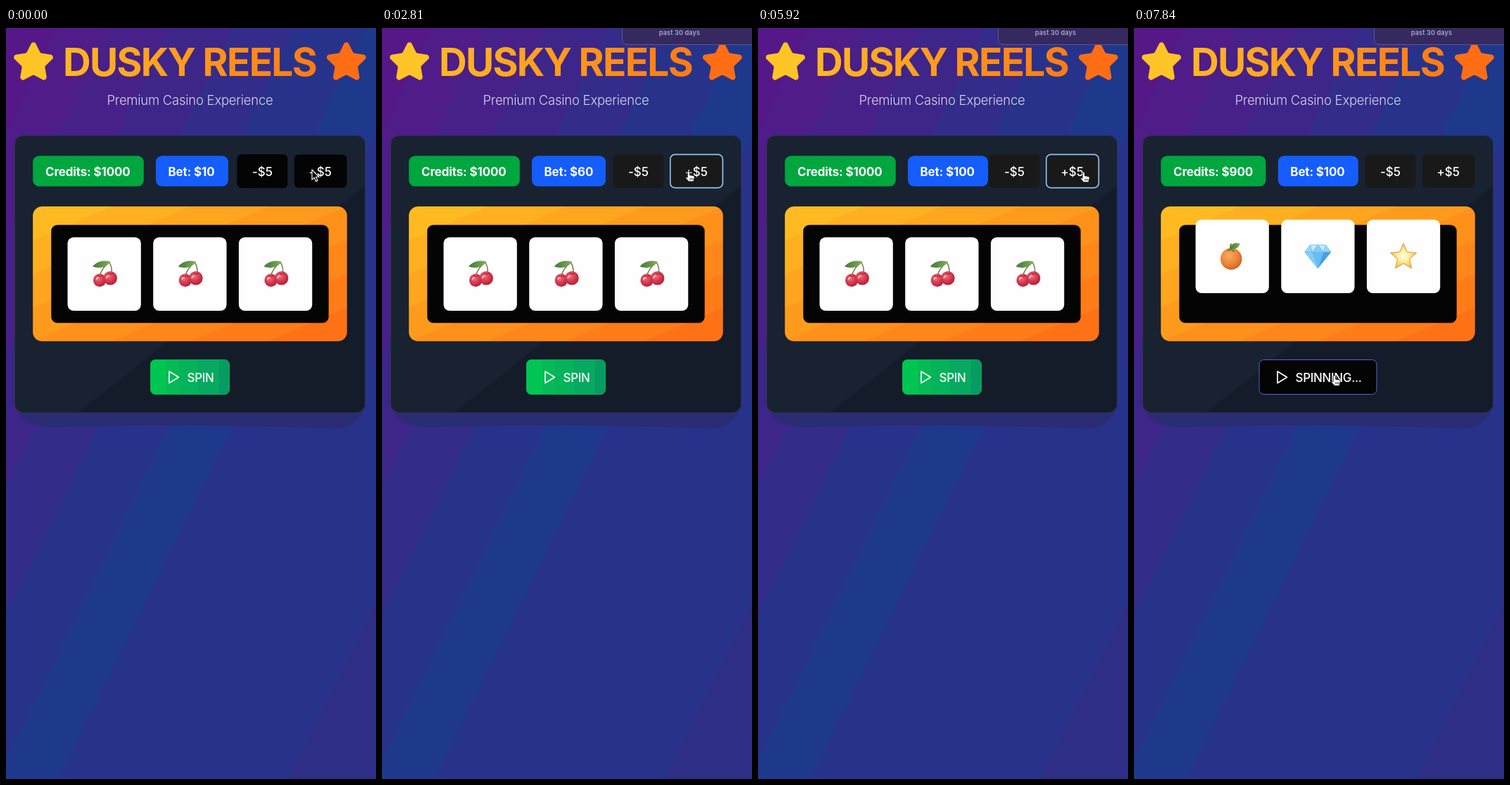
Animation of 526 by 1065 pixels, one loop 7.99 s. Source, as an HTML page:

```html
<!DOCTYPE html>
<html lang="en">
<head>
<meta charset="utf-8">
<title>Slot machine</title>
<style>
  html, body { margin: 0; height: 100%; overflow: hidden; background: #27338a; }
  svg { display: block; width: 100vw; height: 100vh; }
  text { font: 500 17px Inter, sans-serif; fill: #fff; letter-spacing: -.1px; }
  .badge text { font-weight: 700; letter-spacing: -.15px; }
  #spin text { letter-spacing: -.35px; }
</style>
</head>
<body>
<svg viewBox="0 0 526 1065">
  <defs>
    <linearGradient id="bg" x2="1" y2="1"/>
    <linearGradient id="card" x2="1" y2="1"/>
    <linearGradient id="gold" x2="1" y2="1"/>
    <linearGradient id="green"/>
    <linearGradient id="greenHover"/>
    <linearGradient id="heading" gradientUnits="userSpaceOnUse" x1="79" x2="444">
      <stop stop-color="#ffb823"/><stop offset="1" stop-color="#ff7a15"/>
    </linearGradient>
    <radialGradient id="red" cx=".4" cy=".35" r=".7">
      <stop stop-color="#f0707c"/><stop offset=".5" stop-color="#d93a50"/><stop offset="1" stop-color="#a81f38"/>
    </radialGradient>
    <radialGradient id="peel" cx=".4" cy=".35" r=".7">
      <stop stop-color="#f9ac62"/><stop offset=".6" stop-color="#ea8338"/><stop offset="1" stop-color="#c95f24"/>
    </radialGradient>
    <radialGradient id="shine">
      <stop stop-color="#fffce8"/><stop offset=".45" stop-color="#fdeea2"/><stop offset="1" stop-color="#f4c04a"/>
    </radialGradient>
    <linearGradient id="leaf" x2="1">
      <stop stop-color="#3f7a35"/><stop offset="1" stop-color="#86ac5c"/>
    </linearGradient>

    <path id="roundStar" stroke-width="2" stroke-linejoin="round" d="M11.525 2.295a.53.53 0 0 1 .95 0l2.31 4.679a2.12 2.12 0 0 0 1.595 1.16l5.166.756a.53.53 0 0 1 .294.904l-3.736 3.638a2.12 2.12 0 0 0-.611 1.878l.882 5.14a.53.53 0 0 1-.771.56l-4.618-2.428a2.12 2.12 0 0 0-1.973 0L6.396 21.01a.53.53 0 0 1-.77-.56l.881-5.139a2.12 2.12 0 0 0-.611-1.879L2.16 9.795a.53.53 0 0 1 .294-.906l5.165-.755a2.12 2.12 0 0 0 1.597-1.16z"/>

    <g id="cherry">
      <path d="M7-17Q-4-8-7 4M7-17Q12-8 10 0" fill="none" stroke="#75803f" stroke-width="1.5"/>
      <path d="M-16.500-10.500C-11-18 0-20 8.500-17.500C4-9-7-7-16.500-10.500Z" fill="url(#leaf)"/>
      <circle cx="-6.500" cy="9" r="9.200" fill="url(#red)"/>
      <circle cx="8.500" cy="6" r="9.800" fill="url(#red)"/>
      <path d="M-10.500 2.500q4 2.500 8 0M5-1q4 2.500 8 0" fill="none" stroke="#a8283c" stroke-width="1.2"/>
      <path d="M-11 8q0-3 3-3M3 6q0-3 3-3" fill="none" stroke="#fbd0d4" stroke-width="1.5" stroke-linecap="round"/>
    </g>
    <g id="star">
      <polygon points="0,-26 7,-9.600 24.700,-8 11.400,3.700 15.300,21 0,12 -15.300,21 -11.400,3.700 -24.700,-8 -7,-9.600"
        transform="translate(0 1) scale(.75)" fill="url(#shine)" stroke="#e3ac44" stroke-width="1.700" stroke-linejoin="round"/>
    </g>
    <g id="gem" stroke="#6bbcec" stroke-width=".6" stroke-linejoin="round">
      <path d="M-11-16H11L18.5-6 0 17-18.5-6Z" fill="#66bdf2"/>
      <path d="M-11-16-18.5-6H-8ZM11-16 18.5-6H8Z" fill="#97d6f7"/>
      <path d="M-11-16H0L-8-6ZM0-16H11L8-6Z" fill="#c8ebfc"/>
      <path d="M0-16 8-6H-8Z" fill="#86cdf5"/>
      <path d="M-18.5-6H-8L0 17Z" fill="#86ccf6"/>
      <path d="M8-6H18.5L0 17Z" fill="#429fe0"/>
    </g>
    <g id="orange">
      <circle cx="-1.5" cy="3.5" r="15.3" fill="url(#peel)"/>
      <path d="M-2-9Q-4-14-1-18" fill="none" stroke="#6b7a32" stroke-width="1.8"/>
      <path d="M-3-11C-1-19 4-20 11-18C9-11 3-9-3-11Z" fill="url(#leaf)"/>
      <path d="M-7-8-2-10 3-7" fill="none" stroke="#598238" stroke-width="2"/>
    </g>
  </defs>

  <rect width="526" height="1065" fill="url(#bg)"/>

  <use href="#roundStar" transform="translate(8.600 17.700) scale(2.536)" fill="#ffc425" stroke="#ffc425"/>
  <use href="#roundStar" transform="translate(453.400 17.700) scale(2.536)" fill="#ff6e14" stroke="#ff6e14"/>
  <text x="261" y="68" text-anchor="middle" style="font-size:55px;font-weight:700;letter-spacing:-1.7px;fill:url(#heading)">DUSKY REELS</text>
  <text x="261.5" y="109" text-anchor="middle" style="font-size:18.6px;font-weight:300;letter-spacing:-.3px;fill:#d3d5e2">Premium Casino Experience</text>

  <path d="M13 530H510Q506 566 470 568Q260 560 60 566Q18 562 13 530Z" fill="#2a2c74"/>
  <rect x="12.5" y="152.5" width="498" height="393" rx="12" fill="url(#card)" stroke="#283246"/>

  <g class="badge">
    <rect id="creditsBox" x="38.2" y="181.200" height="43.400" rx="8.700" fill="#00a63e"/>
    <text id="credits" x="56" y="209.5"></text>
    <g id="betBadge">
      <rect id="betBox" y="181.200" height="43.400" rx="8.700" fill="#155dfc"/>
      <text id="bet" x="17.5" y="209.5"></text>
    </g>
  </g>
  <g id="betButtons">
    <rect x="328.5" y="179" width="72" height="48" rx="6.500"/>
    <rect id="plus" x="409.8" y="179.400" width="74.600" height="47.200" rx="6.500" stroke-width="1.7"/>
  </g>
  <text x="350" y="209.5">-$5</text>
  <text x="430.5" y="209.5">+$5</text>

  <rect x="38.2" y="253.1" width="446.6" height="191.2" rx="13" fill="url(#gold)"/>
  <rect x="64.3" y="279.200" width="394.400" height="139.100" rx="8.700" fill="#040404"/>
  <g id="reels"></g>

  <g id="spin">
    <rect id="spinBox" y="470.5" height="49" rx="6.500"/>
    <g id="spinLabel">
      <path d="M232 487V503.500L245.500 495.300Z" fill="none" stroke="#fff" stroke-width="1.7" stroke-linejoin="round"/>
      <text id="spinText" x="257.500" y="502"></text>
    </g>
  </g>

  <g id="popup">
    <path d="M341.500-1V16Q341.500 23.500 349 23.500H527V-1Z" fill="#35295f" stroke="#5d5682"/>
    <text x="423" y="10" text-anchor="middle" style="font-size:9.2px;font-weight:600;letter-spacing:.1px;fill:#aaa3cb">past 30 days</text>
  </g>

  <g id="cursor">
    <path id="arrow" d="M0 0V14L3.200 11.200 5.600 16.500 8 15.400 5.700 10.300H10Z" fill="#000" stroke="#fff" stroke-width="1.100"/>
    <g id="hand" transform="scale(.92)" stroke="#000" stroke-width=".9" stroke-linejoin="round">
      <path d="M-2 1Q-2-1-.2-1Q1.600-1 1.600 1V5L7.500 6Q9.300 6.500 9 9L7.500 15H0L-4.800 9.500Q-5 7-2 9Z" fill="#fff"/>
      <path d="M2 9.500V12.500M4.200 9.500V12.500M6.400 9.500V12.500" fill="none"/>
    </g>
  </g>
</svg>
<script>
const $ = id => document.getElementById(id);
const set = (id, attrs) => {
  for (const name in attrs) $(id).setAttribute(name, attrs[name]);
};
const show = (id, on) => set(id, { display: on ? 'inline' : 'none' });

// Hard-edged gradient: each band is [end offset, colour].
function bands(id, list) {
  let from = 0;
  $(id).innerHTML = list.map(([to, color]) => {
    const stops = `<stop offset="${from}" stop-color="${color}"/><stop offset="${to}" stop-color="${color}"/>`;
    from = to;
    return stops;
  }).join('');
}
bands('bg', [[.07, '#561888'], [.14, '#4f1c89'], [.22, '#472089'], [.305, '#3d2589'], [.39, '#332c8a'],
  [.487, '#27338a'], [.57, '#1e388c'], [.88, '#27338a'], [1, '#2f2e87']]);
bands('card', [[.59, '#182230'], [1, '#141b29']]);
bands('gold', Array.from({ length: 8 }, (_, i) => [(i + 1) / 8, `rgb(255 ${186 - 10.4 * i} ${34 - 2 * i})`]));
bands('green', [[.2, '#00c552'], [.36, '#03ba56'], [.6, '#04b35a'], [.87, '#05a95f'], [1, '#059b63']]);
bands('greenHover', [[.14, '#00a340'], [.87, '#06924e'], [1, '#007a55']]);

const LOOP = 7990, START = 270, TICK = 148.3;
const BOUNCE_START = 6965, SPIN_TICK = 46;
const clicks = [0, 3, 4, 5, 6, 7, 8, 9, 10, 17, 20, 29, 30, 31, 32, 33, 36, 38];
// Cursor path: [tick, x, y]
const path = [[-1, 435, 201], [0, 436, 204], [22, 436, 204], [25, 448.5, 209], [26, 455, 238],
  [28, 461, 211], [30, 463, 205], [39, 463, 205], [43, 285, 493.5], [99, 285, 493.5]];
const symbols = ['cherry', 'star', 'gem', 'orange'];
const draws = ['231', '120', '312', '023', '130', '321'];

$('reels').innerHTML = [-121.7, 0, 121.7].map(dx =>
  `<g transform="translate(${261.4 + dx} 348.8)"><rect x="-52.150" y="-52.150" width="104.300" height="104.300" rx="8.700" fill="#fefefe"/><use/></g>`).join('');
const faces = document.querySelectorAll('#reels use');

function ease(x1, y1, x2, y2, x) {
  const at = (a, b, s) => 3 * a * s * (1 - s) ** 2 + 3 * b * s * s * (1 - s) + s ** 3;
  let lo = 0, hi = 1;
  for (let i = 0; i < 20; i++) {
    const mid = (lo + hi) / 2;
    if (at(x1, x2, mid) < x) lo = mid; else hi = mid;
  }
  return at(y1, y2, lo);
}

function bounce(ms) {
  const p = ms % 1000 / 500;
  return -26 * (p < 1 ? 1 - ease(.8, 0, 1, 1, p) : ease(0, 0, .2, 1, p - 1));
}

function cursorAt(tick) {
  const i = path.findIndex(p => p[0] > tick);
  const [t0, x0, y0] = path[i - 1], [t1, x1, y1] = path[i];
  const f = (tick - t0) / (t1 - t0);
  return [x0 + (x1 - x0) * f, y0 + (y1 - y0) * f];
}

function draw(t) {
  const tick = Math.max(-1, Math.floor((t - START) / TICK));
  const bet = 10 + 5 * clicks.filter(c => c <= tick).length;
  const spinning = tick >= SPIN_TICK;
  const hover = tick >= 43 && !spinning;

  $('credits').textContent = 'Credits: $' + (spinning ? 900 : 1000);
  set('creditsBox', { width: spinning ? 149.2 : 157.6 });
  $('bet').textContent = 'Bet: $' + bet;
  set('betBox', { width: bet < 20 ? 103 : bet < 100 ? 105 : 114 });
  set('betBadge', { transform: `translate(${spinning ? 204.8 : 213})` });

  set('betButtons', { fill: tick < 0 ? '#040404' : '#191919' });
  set('plus', { stroke: tick >= 0 && tick < 45 ? '#8ec1f0' : 'none' });
  show('popup', tick >= 6);

  set('spin', { transform: hover ? 'translate(261.5 495) scale(1.04) translate(-261.5 -495)' : '' });
  set('spinBox', {
    x: spinning ? 178 : 205.5,
    width: spinning ? 167 : 112,
    fill: spinning ? '#040404' : hover ? 'url(#greenHover)' : 'url(#green)',
    stroke: spinning ? '#5a62d6' : tick === 45 ? '#8ec1f0' : '#00b852',
    'stroke-width': tick === 45 ? 1.8 : 1
  });
  set('spinLabel', { transform: `translate(${spinning ? -28 : 0})` });
  $('spinText').textContent = spinning ? 'SPINNING...' : 'SPIN';

  const lift = spinning ? bounce(START + tick * TICK - BOUNCE_START) : 0;
  set('reels', { transform: `translate(0 ${lift})` });
  const drawn = spinning ? draws[Math.min(tick - SPIN_TICK, 5)] : '000';
  faces.forEach((face, i) => face.setAttribute('href', '#' + symbols[drawn[i]]));

  const pointing = tick >= 0 && tick < 23 || tick >= 28 && tick < 40 || tick >= 43;
  set('cursor', { transform: `translate(${cursorAt(tick)})` });
  show('hand', pointing);
  show('arrow', !pointing);
}

let begin;
function frame(now) {
  begin ??= now;
  draw((now - begin) % LOOP);
  requestAnimationFrame(frame);
}
draw(0);
requestAnimationFrame(frame);
</script>
</body>
</html>
```
